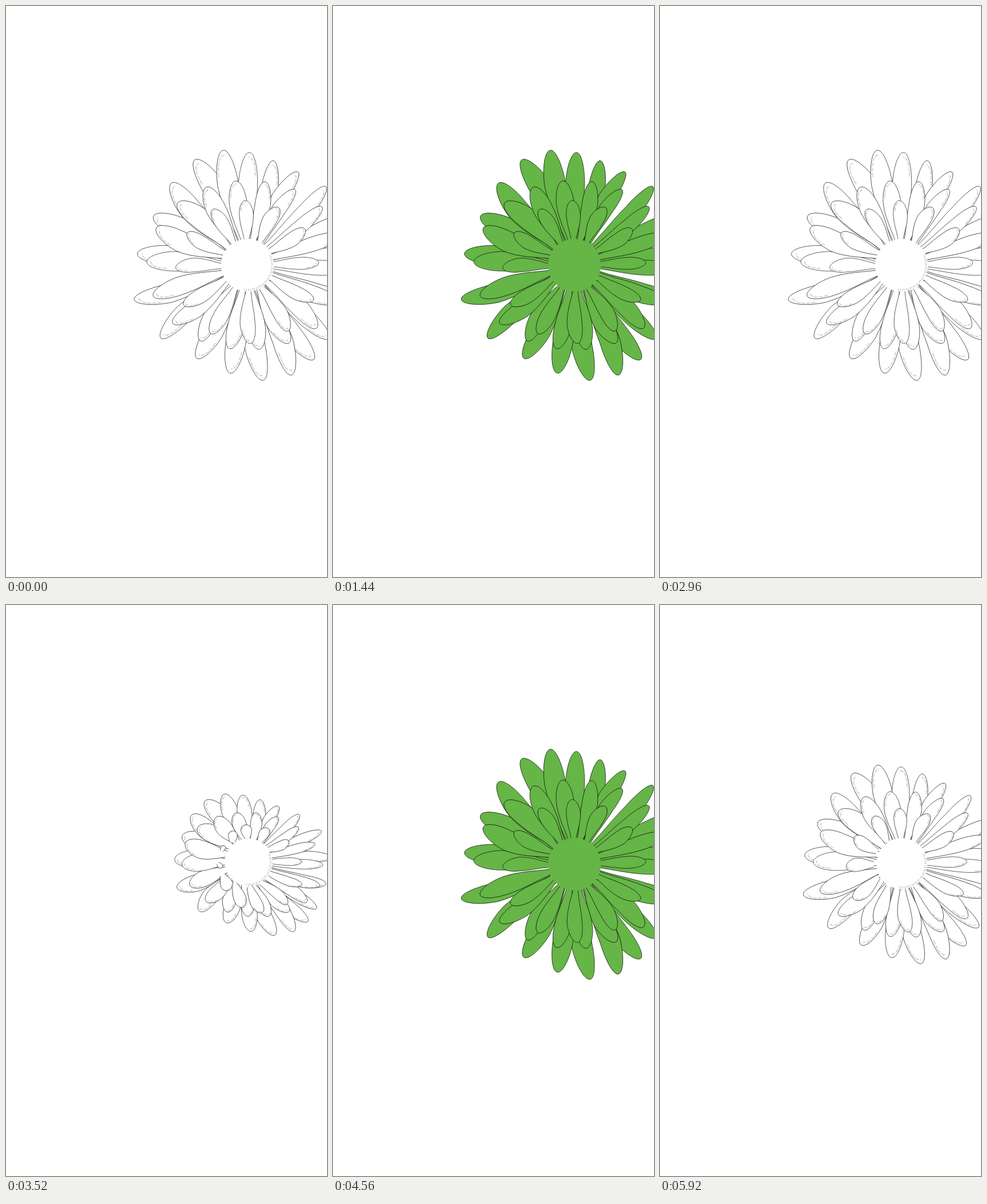
An HTML page with a canvas that plays this animation: 561 by 998 pixels, repeating every 6.08 s.

```html
<!DOCTYPE html>
<html lang="en">
<head>
<meta charset="utf-8">
<title>Opening flower</title>
<style>
  html, body { margin: 0; width: 100%; height: 100%; overflow: hidden; background: #fff; }
  canvas { display: block; width: 561px; height: 998px; }
</style>
</head>
<body>
<canvas id="stage" width="561" height="998"></canvas>
<script>
const ctx = document.getElementById('stage').getContext('2d');
const LOOP = 6080, TICK = 80, STEP = 128.3;
const CENTER = { x: 422, y: 453 };

// How far the flower is closed, from fully open to fully closed.
const CLOSING = [0, 0.22, 0.42, 0.62, 0.93, 1];

// Each look lasts half an opening or closing.
const WHITE = { fill: '#fff', line: 'rgba(0,0,0,.72)', hatch: '#8c8c8c' };
const GREEN = { fill: '#66b547', line: 'rgba(0,0,0,.78)', hatch: null };
const BLUE = { fill: '#0a5b93', line: 'rgba(0,0,0,.72)', hatch: '#6f9bbd' };
const LOOKS = [WHITE, GREEN, BLUE, WHITE];

const mix = (a, b, k) => a + (b - a) * k;
const sin = deg => Math.sin(deg * Math.PI / 180);
const cos = deg => Math.cos(deg * Math.PI / 180);

// Three rings from back to front; angles in degrees, clockwise from the right.
const OUTER = {
  count: 20, width: 33, rim: 0.85, fold: 0,
  angle: i => 37 + 18 * i - 10 * cos(30 * (i - 4)),
  reach: a => 196 + 11 * cos(4 * (a - 70))
};
const MIDDLE = {
  count: 18, width: 30, rim: 0.9, fold: 0,
  angle: i => 2 + 20 * i,
  reach: a => 162 + 14 * cos(2 * a)
};
const INNER = {
  count: 12, width: 24, rim: 1, fold: 55,
  angle: i => 30 * i - 2,
  reach: a => 125 + 12 * sin(a)
};

function drawPetal(ring, i, k, disc, look) {
  const angle = ring.angle(i), reach = ring.reach(angle);
  const dx = cos(angle), dy = sin(angle);
  const left = Math.max(0, -dx) * k;
  const openX = dx * reach, openY = dy * reach;

  // Closing squashes the flower and leans it right; left inner petals fold over the disc.
  const tipX = mix(CENTER.x + openX, 436 + 0.51 * openX + 0.16 * openY, k) + ring.fold * left;
  const tipY = mix(CENTER.y + openY, 454 + 0.38 * openY - 0.03 * openX, k);
  const baseX = disc.x + dx * disc.r * ring.rim - ring.fold * 0.35 * left;
  const baseY = disc.y + dy * disc.r * ring.rim;

  const length = Math.hypot(tipX - baseX, tipY - baseY);
  const variety = 1 + 0.12 * Math.sin(7 * i) - 0.12 * dx;
  const narrowing = 1 - k * (0.38 + 0.2 * dx);
  const half = Math.min(ring.width * variety * narrowing, length * 0.8) / 2;
  const neck = Math.min(4.5, half * 0.6) / half;
  const bend = Math.sin(i * 2.4) * length * 0.05;

  ctx.save();
  ctx.translate(baseX, baseY);
  ctx.rotate(Math.atan2(tipY - baseY, tipX - baseX));

  // s runs along the petal, v across it.
  const point = (s, v) => [s * length, v * half + bend * 4 * s * (1 - s)];
  const curve = (a, b, c) => ctx.bezierCurveTo(...point(...a), ...point(...b), ...point(...c));
  ctx.beginPath();
  ctx.moveTo(...point(0, neck));
  curve([0.2, neck + 0.2], [0.4, 1], [0.63, 1]);
  curve([0.82, 1], [1, 0.55], [1, 0]);
  curve([1, -0.55], [0.82, -1], [0.63, -1]);
  curve([0.4, -1], [0.2, -neck - 0.2], [0, -neck]);
  ctx.fillStyle = look.fill;
  ctx.fill();
  ctx.strokeStyle = look.line;
  ctx.lineWidth = 0.85;
  ctx.stroke();

  if (look.hatch) {
    const side = dx < 0 ? -1 : 1;
    ctx.beginPath();
    ctx.moveTo(...point(0.74, side * 0.74));
    curve([0.86, side * 0.7], [0.95, side * 0.45], [0.95, -side * 0.1]);
    ctx.strokeStyle = look.hatch;
    ctx.lineWidth = 2.2;
    ctx.setLineDash([0.7, 2, 1, 1.6, 0.6, 3]);
    ctx.stroke();
  }
  ctx.restore();
}

function drawRing(ring, k, disc, look) {
  for (let i = 0; i < ring.count; i++) drawPetal(ring, i, k, disc, look);
}

function drawDisc(disc, look) {
  ctx.beginPath();
  ctx.arc(disc.x, disc.y, disc.r, 0, Math.PI * 2);
  ctx.fillStyle = look.fill;
  ctx.fill();
  if (!look.hatch) return;
  ctx.save();
  ctx.strokeStyle = look.hatch;
  ctx.lineWidth = 3;
  ctx.setLineDash([0.6, 2.2, 0.8, 3]);
  ctx.beginPath();
  ctx.arc(disc.x, disc.y, disc.r - 3, -0.4, 1.7);
  ctx.stroke();
  ctx.restore();
}

function draw(now) {
  const time = Math.floor((now % LOOP) / TICK) * TICK;
  const slot = Math.floor(time / STEP);
  const phase = slot % 12;
  const k = CLOSING[Math.min(phase, 11 - phase)];
  const look = LOOKS[Math.floor(slot / 6) % 4];
  const disc = { x: mix(CENTER.x, 425, k), y: mix(CENTER.y, 448, k), r: mix(46, 39, k) };

  ctx.fillStyle = '#fff';
  ctx.fillRect(0, 0, 561, 998);
  drawRing(OUTER, k, disc, look);
  drawRing(MIDDLE, k, disc, look);
  drawDisc(disc, look);
  drawRing(INNER, k, disc, look);
}

const start = performance.now();
function animate() {
  draw(performance.now() - start);
  requestAnimationFrame(animate);
}
animate();
</script>
</body>
</html>
```
